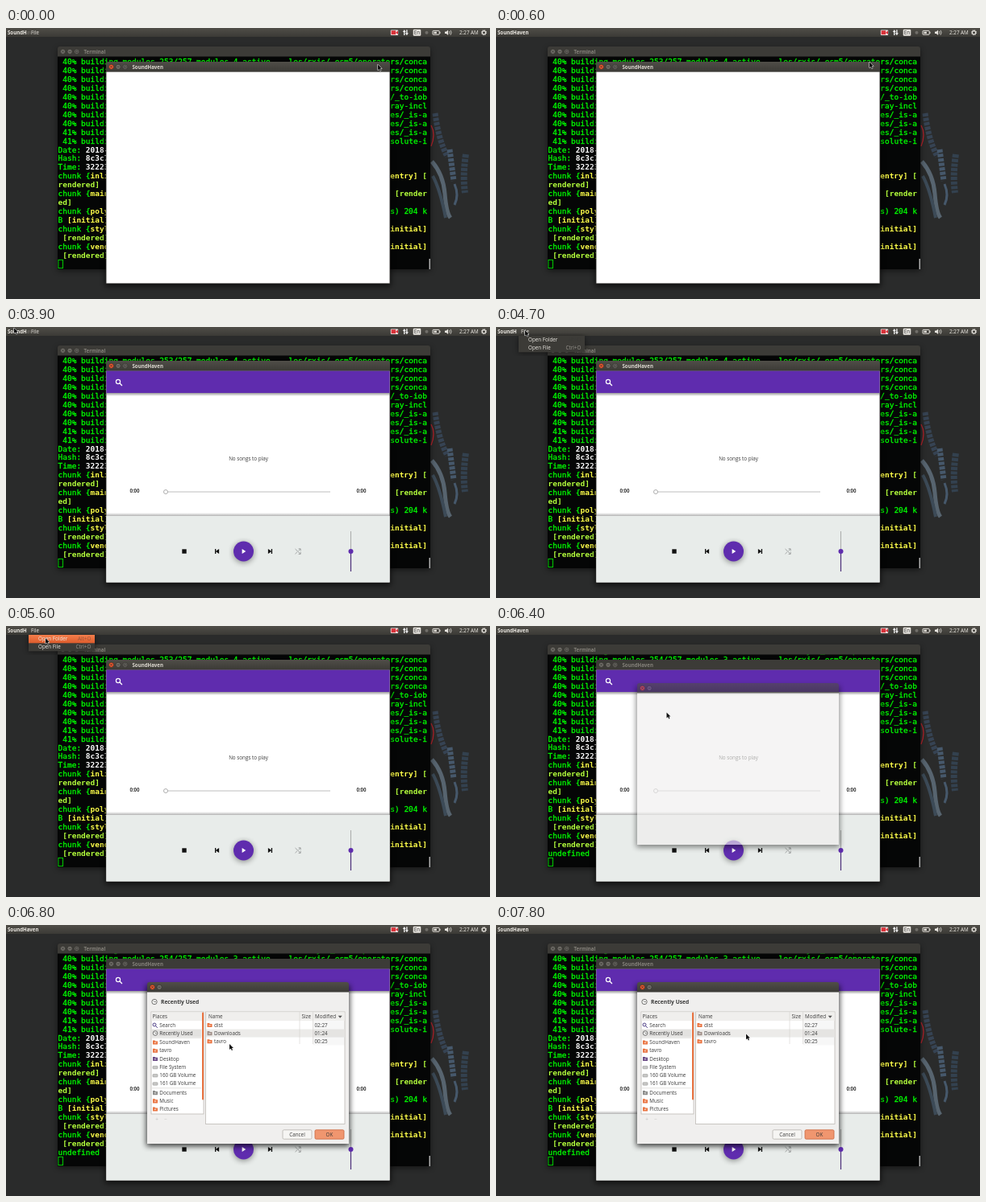
Write an HTML page that moves like this. It is 600x337 px and loops after 8 s.

```html
<!DOCTYPE html>
<html lang="en">
<head>
<meta charset="utf-8">
<title>Desktop player</title>
<style>
  html, body { margin: 0; height: 100%; overflow: hidden; background: #2a2b2b; }
  svg { display: block; width: 100vw; height: 100vh; }
  text { font: 6.3px "Open Sans", sans-serif; fill: #3a3a3a; white-space: pre; }
  .bold { font-weight: 700; font-size: 6.1px; }
  .mid { text-anchor: middle; }
  .light { fill: #eeebe5; }
  .term text { font: 9.5px "DejaVu Sans Mono", monospace; fill: #0f0; stroke: #0f0; stroke-width: .3; }
  .term tspan { font-weight: 700; stroke: none; }
  .end { text-anchor: end; }
  .yellow { fill: #ffff4a; }
  .lime { fill: #b4ff3c; }
  .white { fill: #fff; }
  .bar { fill: url(#bar); }
  .caption { fill: #dfdbd2; }
  .close { fill: #e9552c; }
  .blur > .bar { fill: #3c3b37; }
  .blur > .caption { fill: #85827b; }
  .blur > .close { fill: #6f6d67; }
</style>
</head>
<body>
<script>
const PURPLE = '#5f2cae', ORANGE = '#e9723f', GRAY = '#8a8a88';

const rect = (x, y, w, h, fill, extra = '') =>
  `<rect x="${x}" y="${y}" width="${w}" height="${h}" fill="${fill}" ${extra}/>`;
const circle = (x, y, r, fill, extra = '') =>
  `<circle cx="${x}" cy="${y}" r="${r}" fill="${fill}" ${extra}/>`;
const path = (d, fill, extra = '') => `<path d="${d}" fill="${fill}" ${extra}/>`;
const line = (d, color, width = 1, extra = '') => path(d, 'none', `stroke="${color}" stroke-width="${width}" ${extra}`);
const text = (x, y, s, cls = '', extra = '') => `<text x="${x}" y="${y}" class="${cls}" ${extra}>${s}</text>`;
const group = (id, body, cls = '') => `<g id="${id}" class="${cls}">${body}</g>`;
const shadow = (x, y, w, h, alpha) => rect(x, y, w, h, '#000', `opacity="${alpha}" filter="url(#soft)"`);
const lens = (x, y, s, color) =>
  circle(x, y, s, 'none', `stroke="${color}" stroke-width="${s * .45}"`) +
  line(`M${x + s * .7} ${y + s * .7}l${s * 1.2} ${s * 1.2}`, color, s * .5);

function titleBar(x, y, w, title, buttons) {
  const dots = Array.from({ length: buttons }, (_, i) =>
    `<circle cx="${x + 6.5 + i * 8.6}" cy="${y + 6.3}" r="3.1" fill="#6f6d67" stroke="#2c2b28" stroke-width=".6" class="${i ? '' : 'close'}"/>`);
  const glyphs = line(`M${x + 5.3} ${y + 5.1}l2.4 2.4m0-2.4l-2.4 2.4M${x + 13.7} ${y + 6.3}h2.8` +
    (buttons > 2 ? `M${x + 22.4} ${y + 5}h2.6v2.6h-2.6z` : ''), '#33322f', .7);
  return path(`M${x} ${y + 12.5}v-9.5q0-3 3-3h${w - 6}q3 0 3 3v9.5z`, '', 'class="bar"') +
    dots.join('') + glyphs + text(x + 32.5, y + 8.5, title, 'bold caption');
}

function wallpaper() {
  const plumes = (d, color, width) => line(d, color, width, 'stroke-dasharray="4 1.6"');
  return plumes('M532 106Q536 138 547 160', '#364353', 7) +
    plumes('M570 157Q566 184 569 205', '#33414f', 8) +
    plumes('M550 151L555 190', '#46586b', 7) +
    line('M528 166Q542 182 544 206T551 236', '#57646f', 5) +
    line('M529 184Q538 200 545 236', '#3c4a57', 4) +
    line('M556 194Q562 208 556 220', '#46586b', 3) +
    line('M527 121q6 11 0 26', '#b3222b', 1.3);
}

function panel() {
  return rect(0, 0, 600, 11, 'url(#bar)') +
    text(2, 8, 'SoundH<tspan id="tail">aven</tspan>', 'bold light') +
    text(31, 8, 'File', 'light', 'id="file"') +
    rect(476.8, 2.4, 9.4, 6.6, '#eee', 'rx="1"') + rect(477.6, 3.2, 5.6, 5, '#d8323a') + path('M483 5.7l3-2.4v4.8z', '#d8323a') +
    path('M491.8 5l2-3 2 3h-1.3v4h-1.4v-4zM494.9 6.3h1.3v-4h1.4v4h1.3l-2 3z', '#eee') +
    rect(504.7, 1.8, 9.6, 8, '#e8e5df', 'rx="1.2"') + text(509.5, 8, 'En', 'mid') +
    circle(521.5, 5.7, 2, '#706e69') +
    rect(529, 3.4, 8.2, 4.8, 'none', 'stroke="#e8e5df" rx=".6"') + rect(537.5, 4.8, 1, 2, '#e8e5df') +
    rect(530.4, 4.7, 3.5, 2.2, '#e8e5df') +
    path('M544 4.5h1.8l2.3-2v6.6l-2.3-2H544z', '#e8e5df') + line('M549.3 4q1.4 1.7 0 3.5M551 2.8q2.2 3 0 5.9', '#e8e5df', .8) +
    text(562, 8, '2:27 AM', 'light') +
    circle(592.5, 5.7, 2.1, 'none', 'stroke="#e8e5df" stroke-width="1.1"') +
    circle(592.5, 5.7, 3.1, 'none', 'stroke="#e8e5df" stroke-width="1" stroke-dasharray="1.2 1.23"');
}

function terminal() {
  const build = (pct, mods, tail) => ` ${pct}% building modules ${mods} active ...${tail}`.slice(0, 80);
  const concat = 'les/rxjs/_esm5/operators/conca';
  const core = name => name.padStart(30, '.');
  const rows = [
    [build(40, '253/257 modules 4', concat)],
    ...[1, 2, 3].map(() => [build(40, '254/257 modules 3', concat)]),
    ...['/_to-iob', 'ray-incl', 'es/_is-a', 'es/_is-a', 'es/_is-a', 'solute-i']
      .map((name, i) => [build(i < 4 ? 40 : 41, '254/257 modules 3', core(name))]),
    ['Date: #2018-03#'], ['Hash: #8c3c7#'], ['Time: #32223#ms'],
    ['chunk {*inline*}', '*entry]* ^[^'], ['^rendered]^'],
    ['chunk {*main*}', '^[render^'], ['^ed]^'],
    ['chunk {*poly*', 's) 204 k'], ['B *[initial]*'],
    ['chunk {*styles*}', '*initial]*'], [' ^[rendered]^'],
    ['chunk {*vendor*}', '*initial]*'], [' ^[rendered]^'], ['undefined']
  ];
  const inks = { '*': 'yellow', '^': 'lime', '#': 'white' };
  const ink = s => s.replace(/([*^#])(.*?)\1/g, (_, k, word) => `<tspan class="${inks[k]}">${word}</tspan>`);
  const lines = rows.map(([left, right = ''], i) => {
    const y = 45 + i * 10.95;
    const cls = i == rows.length - 1 ? 'last' : '';
    return `<g class="${cls}">` + text(64.5, y, ink(left)) + text(522, y, ink(right), 'end') + '</g>';
  });
  return shadow(64, 26, 462, 276, .5) + rect(64, 35, 462, 265, '#050606') +
    `<g clip-path="url(#screen)">${group('lines', lines.join(''), 'term')}</g>` +
    rect(65, 288.3, 5.4, 10.4, 'none', 'stroke="#0f0" stroke-width=".8"') +
    rect(524.6, 287, 1.2, 13, '#d8d8d8') +
    `<g class="blur">${titleBar(64, 23, 462, 'Terminal', 3)}</g>`;
}

function player() {
  const skip = (x, dir) =>
    path(`M${x - 2.6 * dir} 276v6l${4.4 * dir}-3z`, '#111') + rect(x + 1.9 * dir - .6, 276, 1.3, 6, '#111');
  const shuffle = 'M358.5 276l6.5 6.2M358.5 282.2l2.4-2.3M362.6 278.3l2.4-2.3M362.6 275.8h2.6v2.6M362.6 282.4h2.6v-2.6';
  return rect(124.4, 82, 351.2, 4, 'url(#fall)') + rect(124.4, 54.3, 351.2, 27.7, PURPLE) + lens(139, 68, 2.6, '#fff') +
    text(300.5, 166.3, 'No songs to play', 'mid') +
    text(159.5, 205.7, '0:00', 'bold mid') + text(440.5, 205.7, '0:00', 'bold mid') +
    line('M200 205h202', '#bdbdbd') + circle(198, 205, 2.5, '#fff', 'stroke="#a5a5a5" stroke-width=".9"') +
    rect(124.4, 231, 351.2, 4, 'url(#rise)') + rect(124.4, 235, 351.2, 82.5, '#e8ecea') +
    rect(218.3, 276.3, 5.4, 5.4, '#111') + skip(261.5, -1) + skip(327.5, 1) +
    circle(294.5, 280.5, 12.8, '#000', 'opacity=".4" filter="url(#soft)"') + circle(294.5, 279, 12.5, PURPLE) +
    path('M292.6 276v6l4.7-3z', '#fff') + line(shuffle, '#9b9e9d', .9) +
    line('M427.5 254v25', '#a9abaa') + line('M427.5 279v25', '#4b2f78', 1.2) + circle(427.5, 279, 3, PURPLE);
}

function app() {
  return shadow(123, 45, 354, 276, .65) +
    rect(124.1, 54, 351.8, 263.8, '#fff', 'stroke="#3c3b37" stroke-width=".6"') +
    group('player', player()) + group('frame', titleBar(124, 42, 352, 'SoundHaven', 3));
}

function dialogContent() {
  const clock = (x, y, r) => circle(x, y, r, '#f4f4f2', 'stroke="#666" stroke-width=".9"') +
    line(`M${x - r * .4} ${y - r * .4}L${x} ${y}h${r * .6}`, '#555', .7);
  const folder = (x, y, color) => path(`M${x - 3} ${y - 2.5}h2.5l.8 .9h2.7v4.2h-6z`, color) + rect(x - 1.3, y - .4, 2.6, 1.4, '#fff', 'opacity=".6"');
  const drive = (x, y) => rect(x - 3, y - 1.2, 6, 3.4, '#c9c9c7', 'stroke="#888" stroke-width=".5" rx=".7"');
  const places = [['Search', 124.5], ['Recently Used', 134.5], ['SoundHaven', 146], ['tavro', 156.2], ['Desktop', 166.4],
    ['File System', 176.6], ['160 GB Volume', 186.8], ['161 GB Volume', 197], ['Documents', 208.6], ['Music', 218.8], ['Pictures', 229]];
  const icon = (i, y) => i == 0 ? lens(184, y - .5, 2, '#45357e') : i == 1 ? clock(185, y, 2.8) :
    i > 4 && i < 8 ? drive(185, y) : folder(185, y, i == 4 ? '#6a4a86' : i == 8 ? GRAY : ORANGE);
  const files = [['dist', '02:27'], ['Downloads', '01:24'], ['tavro', '00:25']];
  const box = (x, w, h) => rect(x, 108, w, h, '#fff', 'stroke="#bdbab5" stroke-width=".8"') + rect(x + .4, 108.4, w - .8, 10.8, '#f0efed');
  return clock(184, 95.5, 3.2) + text(192, 97.8, 'Recently Used', 'bold', 'style="font-size:6.7px"') +
    box(180, 65, 127) + text(181.5, 116.2, 'Places') + rect(180.4, 129.6, 62, 10, '#e3e2e0') +
    places.map(([name, y], i) => icon(i, y) + text(190.3, y + 2.2, name)).join('') +
    line('M181 140.4h61M181 202.8h61', '#d0cecb', .6) +
    rect(243, 108.5, 2, 109, ORANGE, 'rx="1"') +
    text(187, 244, '+', 'mid', 'opacity=".25"') + text(198, 244, '−', 'mid', 'opacity=".25"') +
    box(247.5, 172.5, 139.5) + rect(248, 129.6, 171.6, 10, '#ecebe9') + rect(380.5, 119.4, 39, 30, '#000', 'opacity=".03"') +
    line('M364 108v40M380.5 108v40', '#d3d1ce', .6) +
    text(251, 116.2, 'Name') + text(366.5, 116.2, 'Size') + text(383, 116.2, 'Modified') + path('M411.7 112.7h5l-2.5 3z', '#555') +
    files.map(([name, time], i) => {
      const y = 124.5 + i * 10.1;
      return folder(252.5, y, i == 1 ? '#a08f88' : ORANGE) + text(258, y + 2.2, name) + text(382.5, y + 2.2, time);
    }).join('') +
    rect(343, 254.8, 36, 11.4, '#f6f5f3', 'rx="1.5" stroke="#b5b2ad" stroke-width=".8"') + text(361, 262.8, 'Cancel', 'mid') +
    rect(383, 254.8, 36, 11.4, '#f0966f', 'rx="1.5" stroke="#c9683f" stroke-width=".8"') + text(401, 262.8, 'OK', 'mid');
}

const dialog = () => shadow(174, 75, 252, 200, .75) + rect(175, 83, 250, 189, '#f0efee') +
  titleBar(175, 71, 250, '', 2) + group('content', dialogContent());

const menu = () => shadow(28, 12, 82, 20, .5) + rect(28, 11, 82, 20.3, '#3c3b37') +
  rect(28, 11, 82, 10.3, 'url(#hot)', 'id="hover"') +
  text(40, 18.4, 'Open Folder', 'light') + text(89, 18.4, 'Alt+O', '', 'fill-opacity=".45"') +
  text(40, 28.4, 'Open File', 'light') + text(86.5, 28.4, 'Ctrl+O', '', 'style="fill:#98958e"');

const fade = (id, ...stops) => `<linearGradient id="${id}" x2="0" y2="1">` +
  stops.map(([color, opacity = 1], i) => `<stop offset="${i}" stop-color="${color}" stop-opacity="${opacity}"/>`).join('') + '</linearGradient>';

document.body.innerHTML = `<svg viewBox="0 0 600 337" preserveAspectRatio="none"><defs>
  ${fade('bar', ['#504e48'], ['#3b3a36'])}${fade('hot', ['#f37e4c'], ['#de5c2c'])}
  ${fade('fall', ['#000', .4], ['#000', 0])}${fade('rise', ['#000', 0], ['#000', .3])}
  <filter id="soft" x="-20%" y="-20%" width="140%" height="140%"><feGaussianBlur stdDeviation="3.5"/></filter>
  <clipPath id="screen"><rect x="64" y="35.5" width="462" height="264.5"/></clipPath></defs>` +
  rect(0, 0, 600, 337, '#2a2b2b') + wallpaper() +
  terminal() + app() + group('dialog', dialog()) + panel() + group('menu', menu()) +
  group('pointer', path('M0 0V7L1.7 5.5 2.8 7.9 4 7.4 2.9 5H5Z', '#111', 'stroke="#fff" stroke-width="1" paint-order="stroke"')) + '</svg>';

// Tracks are lists of [ms, value, ...], joined linearly.
const pointerTrack = [[0, 461, 45.5], [100, 461, 45.5], [600, 463, 42.5], [3000, 463, 42.5], [3100, 464, 33.5], [3200, 464, 33.5],
  [3700, 10, 1], [4200, 10, 1], [4700, 36, 4], [4800, 36, 4], [5200, 66, 17], [5400, 66, 17], [5600, 49, 15], [5900, 49, 15],
  [6500, 244, 126], [6800, 277, 148], [7000, 295, 153.5], [7200, 295, 153.5], [7800, 310, 135.5]];
const fileTrack = [[0, .8], [100, .8], [600, 0], [3800, 0], [3900, .8], [4100, 1], [6000, 1], [6300, 0]];
const dialogTrack = [[6200, 0], [6500, .94], [6600, 1]];

function at(track, t) {
  const next = track.findIndex(key => key[0] > t);
  if (next < 0) return track[track.length - 1].slice(1);
  if (next == 0) return track[0].slice(1);
  const a = track[next - 1], b = track[next], k = (t - a[0]) / (b[0] - a[0]);
  return a.slice(1).map((v, i) => v + (b[i + 1] - v) * k);
}

const $ = id => document.getElementById(id);
const show = (el, on) => el.style.display = on ? '' : 'none';
const last = document.querySelector('.last');

function draw(now) {
  const t = Math.floor(now % 8000 / 100) * 100;
  const [file] = at(fileTrack, t);
  $('file').setAttribute('opacity', file);
  $('tail').setAttribute('fill-opacity', 1 - file);
  show($('player'), t >= 2500);
  show($('menu'), t >= 4500 && t < 6100);
  show($('hover'), t >= 5000);
  const scrolled = t >= 6200;
  show(last, scrolled);
  $('lines').setAttribute('transform', `translate(0 ${scrolled ? -10.95 : 0})`);
  $('frame').setAttribute('class', t >= 6300 ? 'blur' : '');
  $('dialog').setAttribute('opacity', at(dialogTrack, t)[0]);
  show($('content'), t >= 6700);
  $('pointer').setAttribute('transform', `translate(${at(pointerTrack, t)})`);
  requestAnimationFrame(draw);
}
requestAnimationFrame(draw);
</script>
</body>
</html>
```
